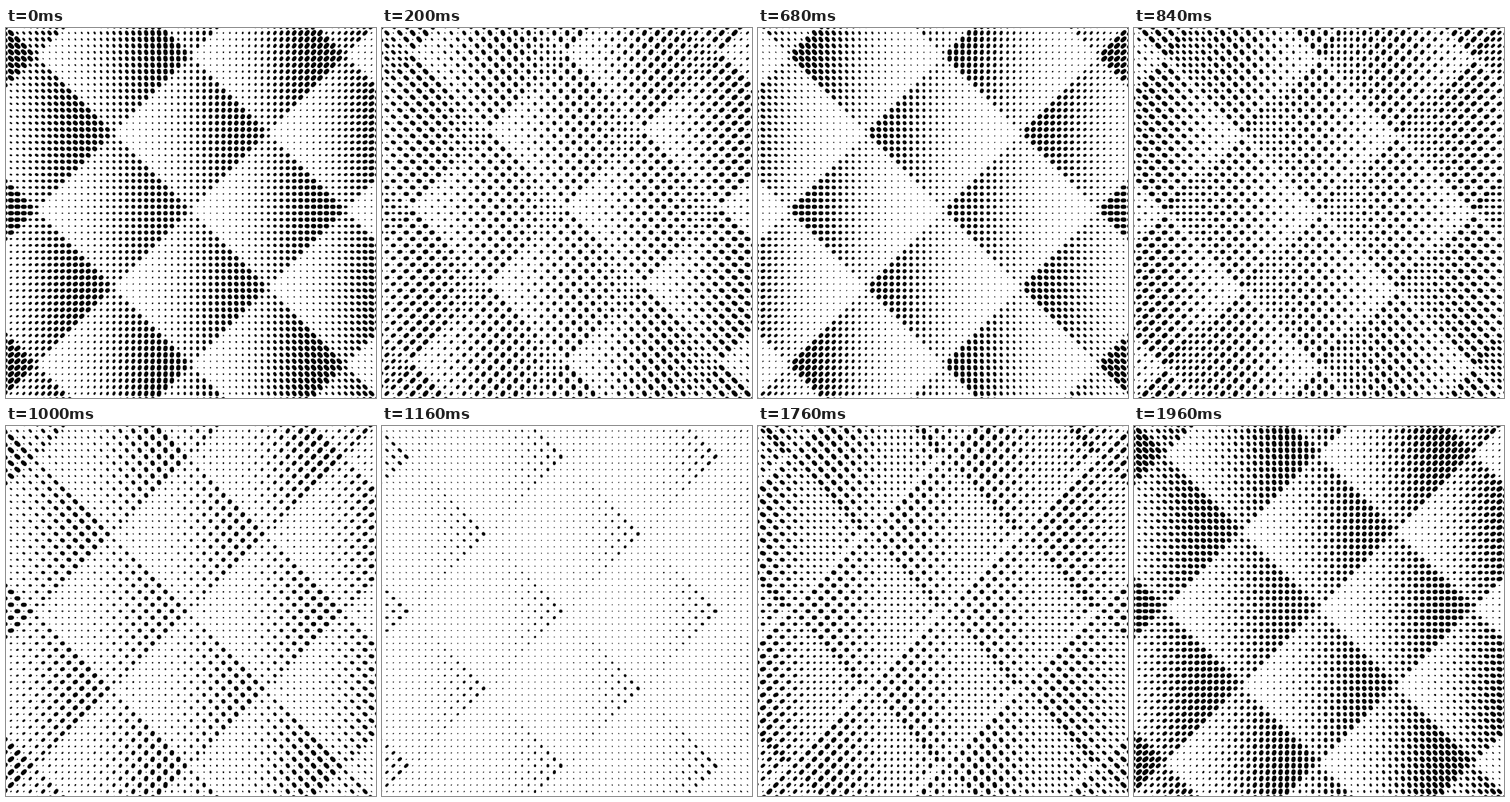
Write an HTML page with a canvas that moves like this. It is 500x500 px and loops after 2000 ms.

```html
<!DOCTYPE html>
<html lang="en">
<head>
<meta charset="utf-8">
<title>Halftone waves</title>
<style>
  html, body { margin: 0; width: 100%; height: 100%; overflow: hidden; background: #fff; }
  canvas { display: block; width: 500px; height: 500px; }
</style>
</head>
<body>
<canvas id="stage" width="500" height="500"></canvas>
<script>
const ctx = document.getElementById('stage').getContext('2d');
const LOOP = 2000, STEP = 40;
const SIZE = 500, MID = 250.3, GAP = 8.7, REACH = 29;
const TILE = 24;          // diamond width in dots
const SPREAD = 0.38;      // share of a cycle across one diamond
const CREST = 0.87;       // where both waves meet as the loop begins
const R_MIN = 0.68, R_MAX = 3;
const LENS = 250;         // perspective distance that stretches outer dots

const mod = (a, n) => ((a % n) + n) % n;

function makeDot(i, j) {
  const even = mod(i + j, 2) === 0;
  const p = mod(i + j, TILE);
  const q = mod(i - j - (even ? 2 : 0), TILE);
  const u = (p + q - (even ? 0 : 2)) / (2 * TILE - 4);
  const dx = i * GAP, dy = j * GAP;
  return {
    x: MID + dx,
    y: MID + dy,
    angle: Math.atan2(dy, dx),
    stretch: Math.hypot(1, Math.hypot(dx, dy) / LENS),
    speed: even ? 1 : 2,
    shift: (even ? 1 : -1) * SPREAD * (u - CREST)
  };
}

const dots = [];
for (let j = -REACH; j <= REACH; j++) {
  for (let i = -REACH; i <= REACH; i++) dots.push(makeDot(i, j));
}

const pulse = phase => Math.pow(0.5 + 0.5 * Math.cos(2 * Math.PI * phase), 3);

function draw(t) {
  ctx.fillStyle = '#fff';
  ctx.fillRect(0, 0, SIZE, SIZE);
  ctx.fillStyle = '#000';
  for (const d of dots) {
    const r = R_MIN + (R_MAX - R_MIN) * pulse(d.speed * t + d.shift);
    ctx.beginPath();
    ctx.ellipse(d.x, d.y, r * d.stretch, r, d.angle, 0, 2 * Math.PI);
    ctx.fill();
  }
}

const start = performance.now();
function tick() {
  const ms = Math.max(0, performance.now() - start) % LOOP;
  draw(Math.floor(ms / STEP) * STEP / LOOP);
  requestAnimationFrame(tick);
}
tick();
</script>
</body>
</html>
```
